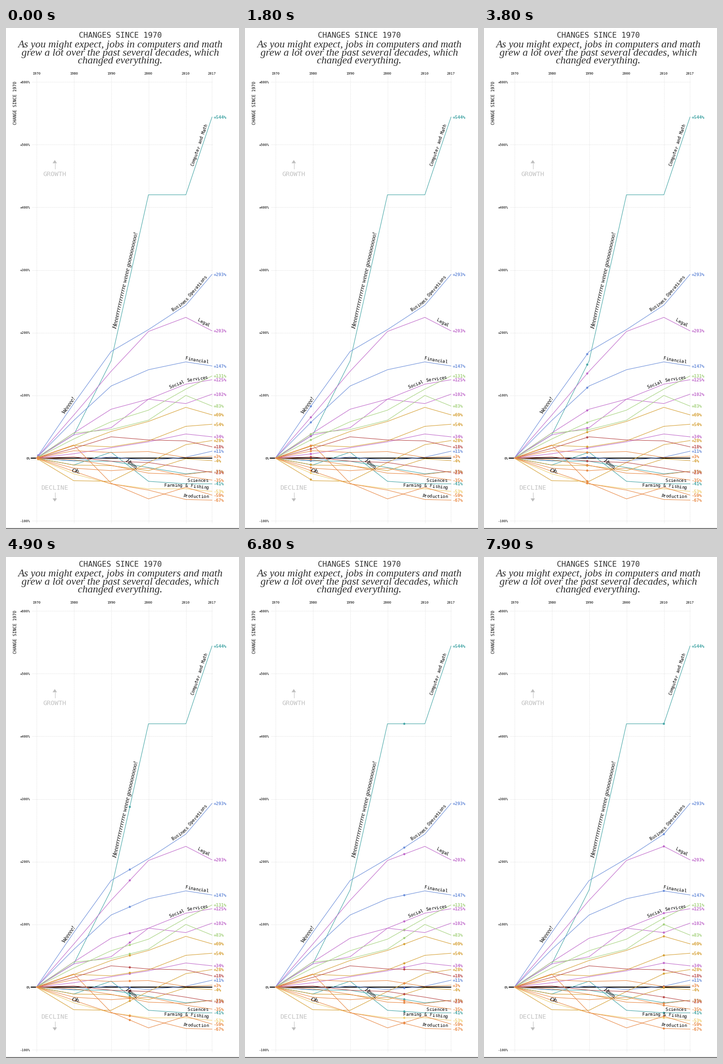
Write a matplotlib script that moves like this. It is 480 by 1032 pixels and loops after 8 s.

```python
import matplotlib.pyplot as plt
import numpy as np
from matplotlib.animation import FuncAnimation

W, H, DPI = 480, 1032, 100
FRAMES, STEP_MS = 80, 100
PX = 72 / DPI
MONO, SERIF = "DejaVu Sans Mono", "Liberation Serif"
ADVANCE = 0.602  # monospace glyph width in em

YEARS = np.array([1970, 1980, 1990, 2000, 2010, 2017])
TEAL, BLUE, PURPLE, GREEN = "#45a6a6", "#6c8fda", "#c06acb", "#a5d27e"
GOLD, RED, YELLOW, ORANGE = "#d6a136", "#b94a4a", "#f0cf6e", "#e98b48"

# colour, percent change in 1980, 1990, 2000, 2010 and 2017, name
SERIES = [
    (TEAL, (37, 155, 420, 420, 544), "Computer and Math"),
    (TEAL, (-11, 9.5, -37, -41, -41), "Sciences"),
    (TEAL, (-4.5, -5, -15, -25, -21), ""),
    (BLUE, (87, 170, 205, 244, 293), "Business Operations"),
    (BLUE, (60, 115, 141, 153.5, 147), "Financial"),
    (BLUE, (-4, 2, -4, 1.5, 11), ""),
    (PURPLE, (68.5, 138.5, 202, 224.5, 203), "Legal"),
    (PURPLE, (40, 78, 94, 118, 125), "Social Services"),
    (PURPLE, (37, 48.5, 94, 87, 102), ""),
    (PURPLE, (7, 16.5, 26, 38.5, 34), ""),
    (GREEN, (30.5, 58, 76.5, 110, 131), ""),
    (GREEN, (40, 45.5, 60.5, 100, 83), ""),
    (GOLD, (20, 42.5, 58.5, 81, 69), ""),
    (GOLD, (20.5, 18, 27.5, 50.7, 54), ""),
    (GOLD, (-36, -37, -7, 21.5, 28), ""),
    (GOLD, (-11, -12, -20, -1, -4), ""),
    (RED, (15.5, 34, 29, 27.5, 18), ""),
    (RED, (2, -5, -7, -16, -23), ""),
    (YELLOW, (-25, -41, -49, -49, -53), "Farming & Fishing"),
    (ORANGE, (11.8, 9, 10.5, 1, 3), ""),
    (ORANGE, (-2.5, -11.5, -24, -26, -21), ""),
    (ORANGE, (-16, -20, -16, -29, -35), ""),
    (ORANGE, (21, -40, -65, -46.5, -59), ""),
    (ORANGE, (-21, -41, -51, -66, -67), "Production"),
]


def x_of(year):
    return 62.5 + 7.7 * (year - 1970)


def y_of(pct):
    return 886 - 1.2915 * np.asarray(pct)


fig = plt.figure(figsize=(W / DPI, H / DPI), dpi=DPI, facecolor="white")
ax = fig.add_axes([0, 0, 1, 1])
ax.set_xlim(0, W)
ax.set_ylim(H, 0)
ax.axis("off")


def label(x, y, s, size, color="black", font=MONO, ha="center", **kw):
    ax.text(x, y, s, fontsize=size * PX, color=color, family=font, ha=ha,
            va="baseline", rotation_mode="anchor", **kw)


def line(xs, ys, color, width, z, **kw):
    ax.plot(xs, ys, color=color, lw=width * PX, zorder=z, **kw)


def text_on_path(xs, ys, s, size=8.95, lift=4):
    """Set text above a polyline, ending 2% before the end of the path."""
    dist = np.r_[0, np.cumsum(np.hypot(np.diff(xs), np.diff(ys)))]
    start = 0.98 * dist[-1] - len(s) * ADVANCE * size
    for i, ch in enumerate(s):
        d = start + (i + 0.5) * ADVANCE * size
        k = np.searchsorted(dist, d) - 1
        a = np.arctan2(ys[k + 1] - ys[k], xs[k + 1] - xs[k])
        label(np.interp(d, dist, xs) + lift * np.sin(a),
              np.interp(d, dist, ys) - lift * np.cos(a),
              ch, size, rotation=-np.degrees(a), zorder=6)


def shout(x, y, s, angle):
    label(x, y, s, 12.5, font=SERIF, ha="left", style="italic",
          rotation=angle, zorder=6)


def arrow(y, tip):
    """Grey arrow with its stem starting at y and its point at tip."""
    back = tip - 6.5 * np.sign(tip - y)
    line([100.5, 100.5], [y, back], "#c4c4c4", 1, 3)
    ax.fill([96, 105, 100.5], [back, back, tip], color="#bdbdbd", lw=0, zorder=3)


# headings
label(235, 20, "CHANGES SINCE 1970", 15.9, "#333333")
for i, s in enumerate(["As you might expect, jobs in computers and math",
                       "grew a lot over the past several decades, which",
                       "changed everything."]):
    label(235, 40 + 16.6 * i, s, 21.5, "#2b2b2b", SERIF, style="italic")

# grid and axes
dots = dict(dashes=(1, 2))
for year in YEARS:
    line([x_of(year)] * 2, [100, 1020], "#cccccc", 0.9, 1, **dots)
    label(x_of(year), 95.7, str(year), 7.1)
for pct in range(-100, 601, 100):
    y = y_of(pct)
    if pct:
        line([54, 425], [y, y], "#cccccc", 0.9, 1, **dots)
    label(50, y + 2.6, f"{pct:+d}%" if pct else "0%", 7.1, ha="right")
line([51, 425], [886, 886], "black", 2, 2, solid_capstyle="butt")
line([0, W], [1031, 1031], "#777777", 2, 2)
label(21.8, 154, "CHANGE SINCE 1970", 8.8, rotation=90)

label(100.5, 304.7, "GROWTH", 13.3, "#c2c2c2")
label(100.5, 950.7, "DECLINE", 13.3, "#c2c2c2")
arrow(290, 272)
arrow(957, 975.5)

# data lines with their names and final values
xs = x_of(YEARS)
values = np.array([(0, *row) for _, row, _ in SERIES])
colors = [c for c, _, _ in SERIES]
for (color, _, name), row in zip(SERIES, values):
    ys = y_of(row)
    line(xs, ys, color, 1.05, 4, solid_joinstyle="round")
    label(428, ys[-1] + 3.4, f"{row[-1]:+.0f}%", 8.95, color, ha="left",
          weight="bold", zorder=5)
    if name:
        text_on_path(xs, ys, name)

shout(227.5, 620, "Heeee" + "r" * 12 + "e weeee g" + "o" * 10 + "!", 77.3)
shout(120.5, 796, "Weeeee!", 55.5)
shout(134.5, 913.5, "Oh.", -15)
shout(245.5, 892.5, "Hmm.", -38)

balls = ax.scatter(np.zeros(len(SERIES)), np.zeros(len(SERIES)),
                   s=(4.4 * PX) ** 2, c=colors, lw=0, zorder=5.5)


def draw(i):
    year = 1970 + 0.5 * (i + 1)
    pct = [np.interp(year, YEARS, row) for row in values]
    balls.set_offsets(np.c_[np.full(len(pct), x_of(year)), y_of(pct)])
    return [balls]


anim = FuncAnimation(fig, draw, frames=FRAMES, interval=STEP_MS,
                     repeat=True, repeat_delay=0, blit=False)
plt.show()
```
